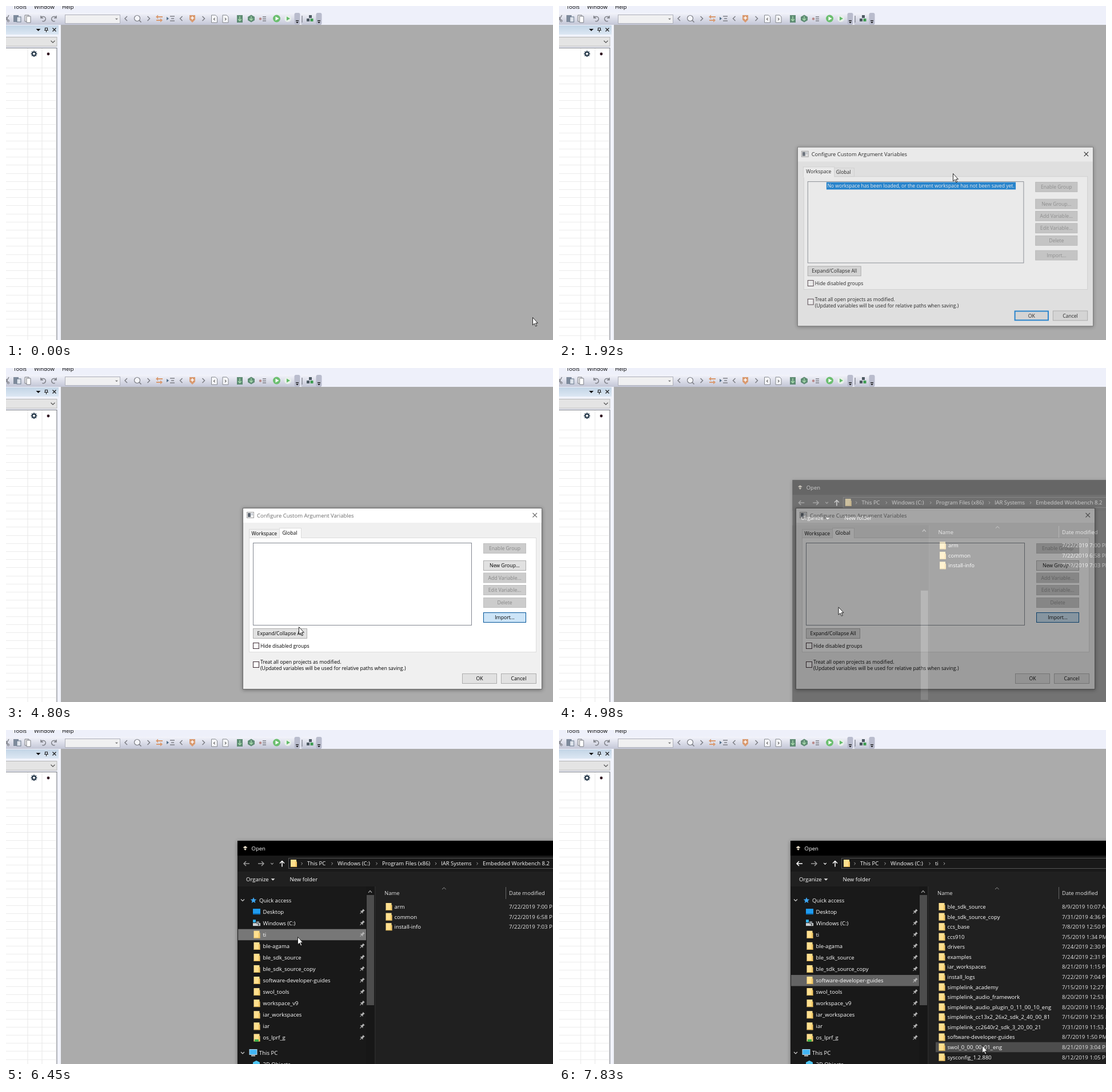
An HTML page for the animation above (8 s loop, 957 by 585 pixels).

```html
<!DOCTYPE html>
<html lang="en">
<head>
<meta charset="utf-8">
<title>Import argument variables</title>
<style>
html, body { margin: 0; width: 100%; height: 100%; overflow: hidden; background: #ababab; }
svg { display: block; font-family: "Open Sans", "Noto Sans", sans-serif; }
text { white-space: pre; }
#dialog, #menu, #files { filter: drop-shadow(0 1px 3px rgba(0, 0, 0, .4)); }
</style>
</head>
<body>
<svg id="stage" width="957" height="585" viewBox="0 0 957 585"></svg>
<script>
const rect = (x, y, w, h, fill, stroke = 'none', sw = 1, more = '') =>
  `<rect x="${x}" y="${y}" width="${w}" height="${h}" fill="${fill}" stroke="${stroke}" stroke-width="${sw}" ${more}/>`;
const text = (x, y, s, fill = '#000', size = 9.5, anchor = 'start') =>
  `<text x="${x}" y="${y}" fill="${fill}" font-size="${size}" text-anchor="${anchor}">${s}</text>`;
const line = (d, stroke, sw = 1, fill = 'none') =>
  `<path d="${d}" stroke="${stroke}" stroke-width="${sw}" fill="${fill}"/>`;
const shape = (d, fill) => `<path d="${d}" fill="${fill}"/>`;
const disc = (x, y, r, fill, stroke = 'none', sw = 1) =>
  `<circle cx="${x}" cy="${y}" r="${r}" fill="${fill}" stroke="${stroke}" stroke-width="${sw}"/>`;
const group = (id, ...parts) => `<g id="${id}">${parts.join('')}</g>`;
const range = (n, f) => Array.from({ length: n }, (_, i) => f(i)).join('');
const left = (x, y, c, r = 4, sw = 1.5) => line(`M${x + r / 2} ${y - r}l${-r} ${r}l${r} ${r}`, c, sw);
const right = (x, y, c, r = 4, sw = 1.5) => line(`M${x - r / 2} ${y - r}l${r} ${r}l${-r} ${r}`, c, sw);
const down = (x, y, c, r = 3, sw = 1.2) => line(`M${x - r} ${y - r / 2}l${r} ${r}l${r} ${-r}`, c, sw);
const triangle = (x, y, c, r = 3) => shape(`M${x - r} ${y - r / 2}h${2 * r}l${-r} ${r}z`, c);

// Main window
function docIcon(x, mark) {
  return line(`M${x - 5} 16h7l3 3v10h-10z`, '#85898f', 1, '#f6f7fa') + mark(x, 23, '#666', 2.2, 1.2);
}
function overflow(x) {
  return rect(x - 5, 12, 10, 21, '#b9bccd', 'none', 0, 'rx="3"') +
    rect(x - 2.5, 25, 5, 1.2, '#111') + triangle(x, 29, '#111', 2.5);
}
function toolbar() {
  const ink = '#7d7f86', orange = '#d99a70', green = '#5f8c74';
  return rect(0, 0, 957, 33, '#eef0fa') +
    rect(-4, 12, 517, 21, 'url(#bar)', 'none', 0, 'rx="3"') +
    rect(516, 12, 36, 21, 'url(#bar)', 'none', 0, 'rx="3"') +
    text(-4, 5, 't') + text(13, 5, 'Tools') + text(49, 5, 'Window') + text(98, 5, 'Help') +
    line('M0 25L5 16M0 19L4 26', ink, 1.4) + disc(4, 26, 1.8, 'none', ink) +
    rect(13, 16, 9, 12, '#7e8b9c') + rect(19, 19, 7, 9, '#dfe4ec', '#66768a') +
    line('M33 16h7v11h-7z', ink, 1, '#eee') + line('M36 18h7v11h-7z', ink, 1, '#fff') +
    line('M61 17v4h4M61.500 20.500a4.200 4.200 0 1 1 2 6', ink, 1.5) +
    line('M88 17v4h-4M87.500 20.500a4.200 4.200 0 1 0-2 6', ink, 1.5) +
    rect(103.5, 15.5, 96, 15, '#f0f0f1', '#aeb0ba') + triangle(193.5, 23, '#777', 2.5) +
    left(210, 22, ink) + disc(229.5, 21.5, 5, '#f4f5fa', ink, 1.2) + line('M233 25l3.500 3.500', ink, 1.6) +
    right(249.5, 22, ink) +
    line('M274 19h-10M263 25h10', orange, 2) + shape('M262 19l4-3.500v7zM274 25l-4-3.500v7z', orange) +
    line('M287 18h8M289 22h5M287 26h8', ink, 1.6) + shape('M281 19l4 3-4 3z', '#55708a') +
    left(306.5, 22, ink) + shape('M321 16h10v8l-5 5-5-5z', orange) + line('M326 18v6M323 21h6', '#fff', 1.5) +
    right(345.5, 22, ink) + docIcon(364.5, left) + docIcon(384, right) +
    rect(404, 16, 10, 13, green) + line('M409 18v7M406 23l3 3 3-3', '#a9dcae', 1.4) +
    shape('M429 15.500l6 3.500v6l-6 3.500-6-3.500v-6z', green) + line('M429 18v7M426 22l3 3 3-3', '#a9dcae', 1.4) +
    disc(445, 22.5, 2.2, '#b98989') + line('M449 19h6M449 22.500h6M449 26h6', ink, 1.5) +
    disc(473.5, 22, 6.5, '#6cbf70') + shape('M471.500 18.500l6 3.500-6 3.500z', '#fff') +
    disc(493, 22, 6, '#e8f0ea') + shape('M491 18.500l6 3.500-6 3.500z', '#62bb69') +
    overflow(509.5) + line('M518 17v12', '#8a8c99', 1.5) +
    rect(530, 16, 5, 5, '#4d5a63') + rect(526, 22, 5, 5, '#4d5a63') + rect(532.5, 22, 5, 5, '#3f9d52') +
    overflow(547.5);
}
function sidePanel() {
  const cog = range(8, i => `<rect x="48" y="78.300" width="2" height="3" fill="#2d3f50" transform="rotate(${i * 45} 49 83.700)"/>`);
  return rect(0, 33, 96, 552, '#f1f3fb') + rect(0, 34, 92, 16, 'url(#title)') +
    triangle(56.5, 42, '#111', 4) + line('M68.500 38.500h4v4h-4zM67 42.500h7M70.500 43v3', '#222', 1.1) +
    line('M81.500 38.500l6 6M87.500 38.500l-6 6', '#222', 1.3) +
    rect(-1, 54.5, 90, 16, '#e4e4e4', '#b5b5b5') + down(82, 62.5, '#555', 3.5) +
    rect(-1, 73.5, 90, 513, '#fff', '#70747c') +
    range(35, i => rect(0, Math.round(108 + i * 14.2), 88, 1, '#ececec')) +
    rect(37.5, 74, 1, 511, '#e8e8e8') + rect(62.5, 74, 1, 511, '#e8e8e8') + rect(87, 74, 1, 511, '#f0f0f0') +
    cog + disc(49, 83.7, 3, 'none', '#2d3f50', 2) + disc(74, 84, 2.4, '#301020');
}
const menuItems = ['Options...', 'Filename Extensions...', 'Configure Viewers...',
  'Configure Custom Argument Variables...', 'Configure Tools...', 'Project Converter...', 'Project Connection...'];
const menu = () => group('menu',
  rect(7.5, 9.5, 226, 150, '#f4f5fb', '#b9bccb'), rect(9, 0, 223, 20, '#c9def5', 'none', 0, 'id="menuHover"'),
  menuItems.map((s, i) => text(34, 25.5 + i * 21, s)).join(''));

// Variables dialog
const small = 8.7;
function button(x, y, w, label, state = 'on') {
  const [fill, edge, ink] = {
    on: ['#e1e1e1', '#adadad', '#000'], off: ['#ccc', '#c0c0c0', '#858585'],
    hover: ['#e5f1fb', '#0078d7', '#000'], down: ['#cce4f7', '#005499', '#000'], main: ['#e1e1e1', '#0078d7', '#000']
  }[state];
  const d = state == 'main' ? 1 : .5;
  return rect(x + d, y + d, w - 2 * d, 18 - 2 * d, fill, edge, 2 * d) +
    text(x + w / 2, y + 12.2, label, ink, small, 'middle');
}
const side = (y, label, state) => button(835, y, 75, label, state);
function dialog() {
  const page = rect(425.5, 297.5, 502, 200, '#fff', '#dcdcdc');
  const tab = (x, w, label, active) => active
    ? rect(x + .5, 280.5, w, 17, '#fff', '#dcdcdc') + rect(x + 1, 296, w - 1, 3, '#fff') + text(x + 5.5, 292, label, '#000', small)
    : rect(x + .5, 282.5, w, 15, '#f0f0f0', '#dcdcdc') + text(x + 4.5, 293.2, label, '#000', small);
  const list = rect(432.5, 306.5, 382, 144, '#fff', '#828790');
  return group('dialog',
    rect(414.5, 245.5, 523, 317, '#f0f0f0', '#6c6c6c'), rect(415, 246, 522, 25, '#fff'),
    rect(421.5, 252.5, 12, 10, '#f2f2f2', '#a0a0a0'), rect(423, 254, 5, 7, '#5d6570'), rect(429, 254, 3, 4, '#c7cdd5'),
    group('caption', text(439, 261.5, 'Configure Custom Argument Variables'),
      line('M921.500 254l7.500 7.500M929 254l-7.500 7.500', '#000', 1.1)),
    group('workspaceTab', page, tab(478, 36, 'Global'), tab(424, 55, 'Workspace', true), list,
      rect(465.5, 307.5, 335, 13, '#0078d7'),
      text(467, 317, 'No workspace has been loaded, or the current workspace has not been saved yet.', '#fff', small),
      side(337, 'New Group...', 'off'), side(428, 'Import...', 'off')),
    group('globalTab', page, tab(425, 53, 'Workspace'), tab(478, 38, 'Global', true), list,
      group('newUp', side(337, 'New Group...')), group('newHover', side(337, 'New Group...', 'hover')),
      group('importUp', side(428, 'Import...')), group('importHover', side(428, 'Import...', 'hover')),
      group('importDown', side(428, 'Import...', 'down'))),
    side(307, 'Enable Group', 'off'), side(358.5, 'Add Variable...', 'off'),
    side(380, 'Edit Variable...', 'off'), side(402, 'Delete', 'off'),
    button(432, 456, 95, 'Expand/Collapse All'),
    rect(432.5, 481.5, 10, 10, '#fff', '#3c2a33'), text(445, 490, 'Hide disabled groups', '#000', small),
    rect(432.5, 514.5, 10, 10, '#fff', '#3c2a33'), text(445, 518, 'Treat all open projects as modified.', '#000', small),
    text(445, 529, '(Updated variables will be used for relative paths when saving.)', '#000', small),
    group('okMain', button(798, 535, 61, 'OK', 'main')), group('okPlain', button(798, 535, 61, 'OK')),
    button(866, 535, 62, 'Cancel'));
}

// File dialog
const white = '#fff', rowH = 17.57, placeH = 20.07;
const folder = (x, y) => rect(x, y - 6.5, 10, 13, '#ffe08f') + rect(x + 8, y - 3, 3, 9.5, '#f3c969') + rect(x, y + 5.5, 11, 1, '#d9ae50');
const places = ['Quick access', 'Desktop', 'Windows (C:)', 'ti', 'ble-agama', 'ble_sdk_source', 'ble_sdk_source_copy',
  'software-developer-guides', 'swol_tools', 'workspace_v9', 'iar_workspaces', 'iar', 'os_lprf_g'];
const before = [['arm', '7/22/2019 7:00 PM'], ['common', '7/22/2019 6:58 PM'], ['install-info', '7/22/2019 7:03 PM']];
const after = [['ble_sdk_source', '8/9/2019 10:07 AM'], ['ble_sdk_source_copy', '7/31/2019 4:36 PM'],
  ['ccs_base', '7/8/2019 12:50 PM'], ['ccs910', '7/5/2019 1:34 PM'], ['drivers', '7/24/2019 2:30 PM'],
  ['examples', '7/24/2019 2:31 PM'], ['iar_workspaces', '8/21/2019 1:15 PM'], ['install_logs', '7/22/2019 7:04 PM'],
  ['simplelink_academy', '7/15/2019 12:27 PM'], ['simplelink_audio_framework', '8/20/2019 12:53 PM'],
  ['simplelink_audio_plugin_0_11_00_10_eng', '8/20/2019 11:59 AM'],
  ['simplelink_cc13x2_26x2_sdk_2_40_00_81', '7/16/2019 12:35 PM'],
  ['simplelink_cc2640r2_sdk_3_20_00_21', '7/31/2019 11:53 AM'], ['software-developer-guides', '8/7/2019 1:50 PM'],
  ['swol_0_00_00_01_eng', '8/21/2019 3:04 PM'], ['sysconfig_1.2.880', '8/12/2019 1:05 PM']];
const files = rows => rows.map(([name, date], i) => {
  const y = 309.5 + i * rowH;
  return folder(664.5, y) + text(679.5, y + 3.5, name, white) + text(880, y + 3.5, date, '#e4e4e4', 9.7);
}).join('');
const crumbs = list => list.map(([x, s]) => text(x, 236.7, s, white)).join('');
const pin = y => `<g transform="translate(623 ${y}) rotate(45)">${shape('M-2-4.500h4v1h-.5v3l2 2h-3v3.500h-1v-3.500h-3l2-2v-3h-.5z', '#b4b4b4')}</g>`;
function placeIcon(i, y) {
  if (i == 1) return rect(432, y - 5, 13, 10, '#1f9cf0') + rect(432, y + 3, 13, 2, '#0d6fb8');
  if (i == 2) return rect(432, y, 13, 5, '#cfd3d6') + rect(432, y - 6, 5, 5, '#35b3ee') + rect(438, y - 3, 5, 5, '#858b90') + disc(442, y + 3, 1.2, '#444');
  return folder(433.5, y) + (i == 12 ? rect(435, y + 3, 7, 4, '#3fae49') : '');
}
const monitor = y => rect(426, y - 6, 13, 9, '#42b4f4', '#b9d9ea') + rect(429, y + 4, 7, 2, '#c7c7c7');
function fileDialog() {
  const arrow = (x, d, c) => line(`M${x - 5 * d} 234h${10 * d}M${x + d} 230l${4 * d} 4l${-4 * d} 4`, c, 1.5);
  return group('files',
    rect(405, 194, 560, 400, '#202020'), rect(405, 194, 552, 26, '#000'), rect(405, 220, 552, 28, '#191919'),
    rect(405, 274, 241, 311, '#191919'),
    shape('M414.500 206l4-3 4 3-4 1.500zM416 208l2.500 3 2.500-3z', '#e9dfc9'), text(429.5, 210.7, 'Open', '#fff'),
    arrow(446, 1, '#9a9a9a'), line('M483 239.500v-10M479 233.500l4-4 4 4', '#fff', 1.5),
    rect(494.5, 224.500, 470, 18, '#191919', '#555'), folder(498, 233.5), right(517.5, 234, '#aaa', 2.2, 1),
    crumbs([[527, 'This PC'], [580, 'Windows (C:)']]), right(570.5, 234, '#aaa', 2.2, 1), right(648.5, 234, '#aaa', 2.2, 1),
    group('pathBefore', arrow(421, -1, '#9a9a9a'), down(465.5, 234, '#9a9a9a', 2.3),
      crumbs([[658, 'Program Files (x86)'], [761, 'IAR Systems'], [834, 'Embedded Workbench 8.2']]),
      right(752, 234, '#aaa', 2.2, 1), right(824.5, 234, '#aaa', 2.2, 1)),
    group('pathAfter', arrow(421, -1, '#fff'), down(465.5, 234, '#fff', 2.3), crumbs([[658, 'ti']]), right(674, 234, '#aaa', 2.2, 1)),
    text(420, 264.8, 'Organize', white), triangle(467, 262, '#ddd', 3.5), text(496.5, 264.8, 'New folder', white),
    rect(630, 274, 15, 311, '#171717'), line('M634 285l3-3.500 3 3.500', '#999', 1.2),
    rect(631, 289, 13, 193, '#4d4d4d', 'none', 0, 'id="thumb"'), rect(645, 274, 1.5, 311, '#2b2b2b'),
    text(662, 289, 'Name', '#e0e0e0'), line('M763 279l3.300-3 3.300 3', '#999'), rect(874, 275, 1, 21, '#666'),
    text(880, 289, 'Date modified', '#e0e0e0'),
    rect(406, 0, 224, 19.5, '#636363', 'none', 0, 'id="chosen"'), rect(406, 0, 224, 19.5, '#4d4d4d', 'none', 0, 'id="placeHover"'),
    rect(659, 0, 298, rowH, '#4d4d4d', 'none', 0, 'id="rowHover"'),
    group('places', down(414, 298, '#ccc'), shape('M433 293l1.500 3.500 3.800.300-2.900 2.500.900 3.700-3.300-2-3.300 2 .900-3.700-2.900-2.500 3.800-.300z', '#3ea6f2'),
      places.map((s, i) => {
        const y = 298 + i * placeH;
        return text(i ? 449.5 : 443, y + 3.5, s, white) + (i ? placeIcon(i, y) + pin(y) : '');
      }).join(''),
      down(414, 565.5, '#ccc'), monitor(565.5), text(443, 569, 'This PC', white),
      shape('M432 582l6-3 6 3v4h-12z', '#4cc3ef'), text(449.5, 589, '3D Objects', white)),
    group('rowsBefore', files(before)), group('rowsAfter', files(after)));
}

const gradient = (id, a, b) => `<linearGradient id="${id}" x2="0" y2="1"><stop stop-color="${a}"/><stop offset="1" stop-color="${b}"/></linearGradient>`;
stage.innerHTML = `<defs>${gradient('bar', '#f3f4fb', '#c3c6d6')}${gradient('title', '#c3d5e6', '#dce7f3')}</defs>` +
  rect(0, 0, 957, 585, '#ababab') + toolbar() + sidePanel() + menu() + dialog() + fileDialog() +
  group('arrow', line('M.500.500V13.800L3.600 11 5.700 15.900 7.700 15.100 5.600 10.300H9.400z', '#111', .9, '#fff')) +
  group('hand', line('M2.500 10V1.500a1.400 1.400 0 0 1 2.800 0V7l6 1.200q1.800.500 1.700 2.500l-.800 4.500-1.200 3H5.500L4 15.500.300 10.700q0-1.800 2.200-.7z', '#111', .8, '#fff'));

const bursts = [[0, 0, 1], [70, 840, 11], [910, 1540, 9], [1690, 2460, 11], [2540, 3340, 11], [3410, 4180, 11],
  [4260, 5040, 11], [5120, 5660, 8], [5810, 5900, 2], [6040, 6820, 11], [6900, 7210, 5], [7520, 7830, 5]];
// Pointer path: time, x, y
const path = [[0, 921, 545], [840, 44, 6], [980, 26, 4], [1080, 26, 5], [1540, 130, 86], [1690, 130, 86],
  [1920, 689, 293], [2460, 520, 296], [2620, 498, 291], [2760, 498, 291], [3340, 885, 332], [3410, 885, 345],
  [3490, 882, 381], [3860, 869, 436], [4200, 867, 438], [4800, 512, 453], [5120, 466, 385], [5660, 489, 375],
  [5810, 489, 375], [5900, 497, 370], [5960, 497, 370], [6300, 510, 362], [6560, 510, 362], [6820, 700, 378],
  [7210, 745, 517], [7440, 745, 517], [7830, 740, 552]];

function stepTime(t) {
  const [a, b, n] = bursts.findLast(s => s[0] <= t);
  if (n < 2) return a;
  const gap = (b - a) / (n - 1);
  return a + Math.min(n - 1, Math.floor((t - a) / gap + .1)) * gap;
}
function pointer(t) {
  const i = path.findLastIndex(p => p[0] <= t), a = path[i], b = path[i + 1] || a;
  const u = b == a ? 0 : (t - a[0]) / (b[0] - a[0]), k = u * u * (3 - 2 * u);
  return [a[1] + (b[1] - a[1]) * k, a[2] + (b[2] - a[2]) * k];
}
const $ = id => document.getElementById(id);
const show = (id, on) => $(id).style.display = on ? '' : 'none';
const swap = (on, a, b) => { show(a, on); show(b, !on); };
const place = (id, y, on) => { show(id, on); $(id).setAttribute('y', y); };
function appear(id, p, cx, cy, shrink) {
  show(id, p > 0);
  const s = 1 - shrink * (1 - p);
  $(id).setAttribute('opacity', p);
  $(id).setAttribute('transform', `translate(${cx * (1 - s)} ${cy * (1 - s)}) scale(${s})`);
}

function draw(now) {
  const t = stepTime(now % 8000), [x, y] = pointer(t);

  show('menu', t > 1030 && t < 1690);
  const item = Math.floor((y - 11.5) / 21);
  place('menuHover', 12 + item * 21, item >= 0);

  appear('dialog', t < 1840 ? 0 : t < 1900 ? .3 : t < 1990 ? .76 : 1, 676, 404, .0476);
  swap(t < 2700, 'workspaceTab', 'globalTab');
  const pressed = t > 4020;
  swap(!pressed, 'okMain', 'okPlain');
  const onButtons = x > 835 && x < 910;
  swap(onButtons && y > 337 && y < 355, 'newHover', 'newUp');
  const onImport = onButtons && y > 428 && y < 446;
  show('importUp', !pressed && !onImport);
  show('importHover', !pressed && onImport);
  show('importDown', pressed);
  $('caption').setAttribute('opacity', t > 4320 ? .58 : 1);

  appear('files', t < 4940 ? 0 : t < 5000 ? .4 : t < 5100 ? .85 : 1, 885, 500, .012);
  const loaded = t > 5180, opened = t > 6540, moved = t > 7560;
  show('places', loaded);
  $('thumb').setAttribute('y', loaded ? 289 : 389);
  swap(!opened, 'pathBefore', 'pathAfter');
  swap(!opened, 'rowsBefore', 'rowsAfter');
  const chosen = t < 6400 ? -1 : moved ? 7 : 3;
  const over = loaded && x > 406 && x < 630 ? Math.round((y - 298) / placeH) : -1;
  place('chosen', 288.5 + chosen * placeH, chosen > 0);
  $('chosen').setAttribute('fill', over == chosen ? '#777' : '#636363');
  place('placeHover', 288.5 + over * placeH, over > 0 && over != chosen);
  const row = Math.round((y - 309.5) / rowH);
  place('rowHover', 309.5 + (row - .5) * rowH, opened && x > 659 && row >= 0);

  swap(t > 5000 && t < 5180, 'hand', 'arrow');
  $('arrow').setAttribute('transform', `translate(${x} ${y})`);
  $('hand').setAttribute('transform', `translate(${x - 3} ${y})`);
}
const start = performance.now();
function tick() {
  draw(performance.now() - start);
  requestAnimationFrame(tick);
}
tick();
</script>
</body>
</html>
```
